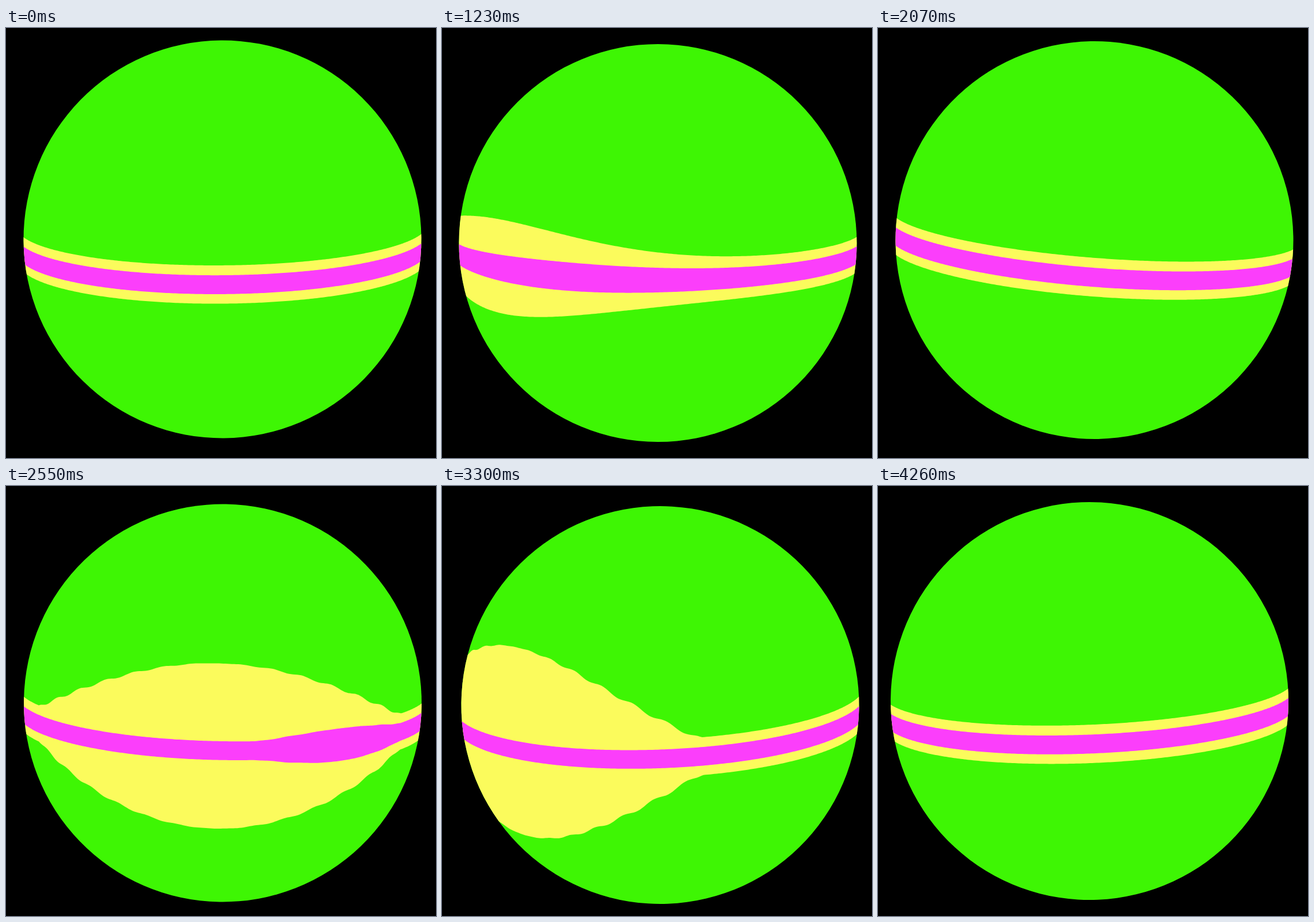
An HTML page with a canvas for the animation above (4290 ms loop, 748 by 748 pixels).

```html
<!DOCTYPE html>
<html lang="en">
<head>
<meta charset="utf-8">
<title>Belted sphere</title>
<style>
html, body { margin: 0; width: 100%; height: 100%; overflow: hidden; background: #000; }
canvas { display: block; width: 100%; height: 100%; }
</style>
</head>
<body>
<canvas id="stage" width="748" height="748"></canvas>
<script>
const ctx = document.getElementById('stage').getContext('2d');
const LOOP = 4290, STEP = 30;
const GREEN = '#3ef604', YELLOW = '#fbfb5c', PINK = '#fb3efb';
const DISC = 346;                 // visible disc
const BALL = 357, DIST = 9;       // the belt lies on a slightly larger ball
const FOCAL = BALL * Math.sqrt(DIST * DIST - 1);
const SPIN = 1.05;                // radians per second, towards the left
const RIPPLE = 43;

// Key poses of the swaying camera: seconds, x, y, pitch, roll.
const poses = [
  [0, 376.5, 367.5, 0.2, -0.008],
  [0.3, 381, 367, 0.182, 0.018],
  [0.75, 377.5, 370, 0.161, 0.04],
  [1.23, 375.5, 374, 0.163, 0.0015],
  [2.07, 376.5, 369, 0.163, 0.079],
  [2.55, 377, 377.5, 0.21, 0.0166],
  [2.95, 379, 387.5, 0.24, -0.015],
  [3.3, 379.5, 381, 0.238, -0.038],
  [3.75, 380.3, 371.5, 0.215, -0.045],
  [4.26, 368, 374, 0.1895, -0.0405]
];

// Swells ride the turning ball: longitude at time 0, half width, peak height,
// then the seconds at which they start, peak and end.
const swell = (lon, width, peak, from, top, end) => ({ lon, width, peak, from, top, end });
const yellowSwells = [
  swell(0.46, 0.83, 0.235, 0.2, 0.75, 1.8),
  swell(-0.71, 0.54, 0.09, 0.1, 0.6, 1.6),
  swell(2.65, 0.98, 0.42, 2.08, 3.1, 4.1)
];
const pinkSwells = [
  swell(0.79, 0.76, 0.062, 0.25, 0.75, 1.55),
  swell(3.23, 0.4, 0.033, 2.2, 2.6, 3.2)
];

const ramp = (a, b, t) => Math.min(1, Math.max(0, (t - a) / (b - a)));
const smooth = u => u * u * (3 - 2 * u);

// Smooth curve through one column of the poses.
function pose(col, t) {
  const last = poses.length - 1;
  const slope = i => {
    const a = poses[Math.max(i - 1, 0)], b = poses[Math.min(i + 1, last)];
    return (b[col] - a[col]) / (b[0] - a[0]);
  };
  let i = 0;
  while (i < last - 1 && t >= poses[i + 1][0]) i++;
  const p = poses[i], q = poses[i + 1];
  const h = q[0] - p[0], u = (t - p[0]) / h, v = 1 - u;
  return p[col] * smooth(v) + q[col] * smooth(u)
    + h * u * v * (slope(i) * v - slope(i + 1) * u);
}

function beltWidth(base, swells, step, t) {
  const live = swells.filter(s => t > s.from && t < s.end).map(s => {
    const rise = ramp(s.from, s.top, t), fall = ramp(s.top, s.end, t);
    return {
      lon: s.lon - SPIN * t,
      width: s.width,
      amp: s.peak * rise * (2 - rise) * (1 - smooth(fall)),
      soft: smooth(ramp(0.2, 0.45, fall))
    };
  });
  return lon => {
    let extra = 0;
    for (const s of live) {
      const x = lon - s.lon;
      const d = (x + step * (1 - s.soft) * Math.sin(RIPPLE * x) / RIPPLE) / s.width;
      const hill = Math.abs(d) < 1 ? Math.cos(Math.PI / 2 * d) ** 1.1 : 0;
      const bell = Math.exp(-d * d * 1.3);
      extra = Math.max(extra, s.amp * (hill + (bell - hill) * s.soft));
    }
    return base + extra;
  };
}

function project(lat, lon, tilt) {
  const down = Math.sin(lat), out = Math.cos(lat) * Math.cos(lon);
  const x = Math.cos(lat) * Math.sin(lon);
  const y = down * Math.cos(tilt) + out * Math.sin(tilt);
  const z = out * Math.cos(tilt) - down * Math.sin(tilt);
  // Points behind the rim go outside the clip circle.
  const k = z > 1 / DIST ? FOCAL / (DIST - z) : 1.3 * BALL / Math.hypot(x, y);
  return [x * k, y * k];
}

function drawBelt(width, color, tilt) {
  const N = 320, END = 1.6;
  ctx.beginPath();
  for (const side of [-1, 1]) {
    for (let i = 0; i <= N; i++) {
      const lon = side * END * (1 - 2 * i / N);
      ctx.lineTo(...project(side * width(lon), lon, tilt));
    }
  }
  ctx.closePath();
  ctx.fillStyle = color;
  ctx.fill();
}

function draw(t) {
  const tilt = pose(3, t);
  ctx.fillStyle = '#000';
  ctx.fillRect(0, 0, 748, 748);
  ctx.save();
  ctx.translate(pose(1, t), pose(2, t));
  ctx.rotate(pose(4, t));
  ctx.beginPath();
  ctx.arc(0, 0, DISC, 0, 2 * Math.PI);
  ctx.fillStyle = GREEN;
  ctx.fill();
  ctx.clip();
  drawBelt(beltWidth(0.0859, yellowSwells, 0.6, t), YELLOW, tilt);
  drawBelt(beltWidth(0.0423, pinkSwells, 0.4, t), PINK, tilt);
  ctx.restore();
}

const start = performance.now();
function tick() {
  const ms = Math.max(0, performance.now() - start) % LOOP;
  draw(Math.floor(ms / STEP) * STEP / 1000);
  requestAnimationFrame(tick);
}
tick();
</script>
</body>
</html>
```
